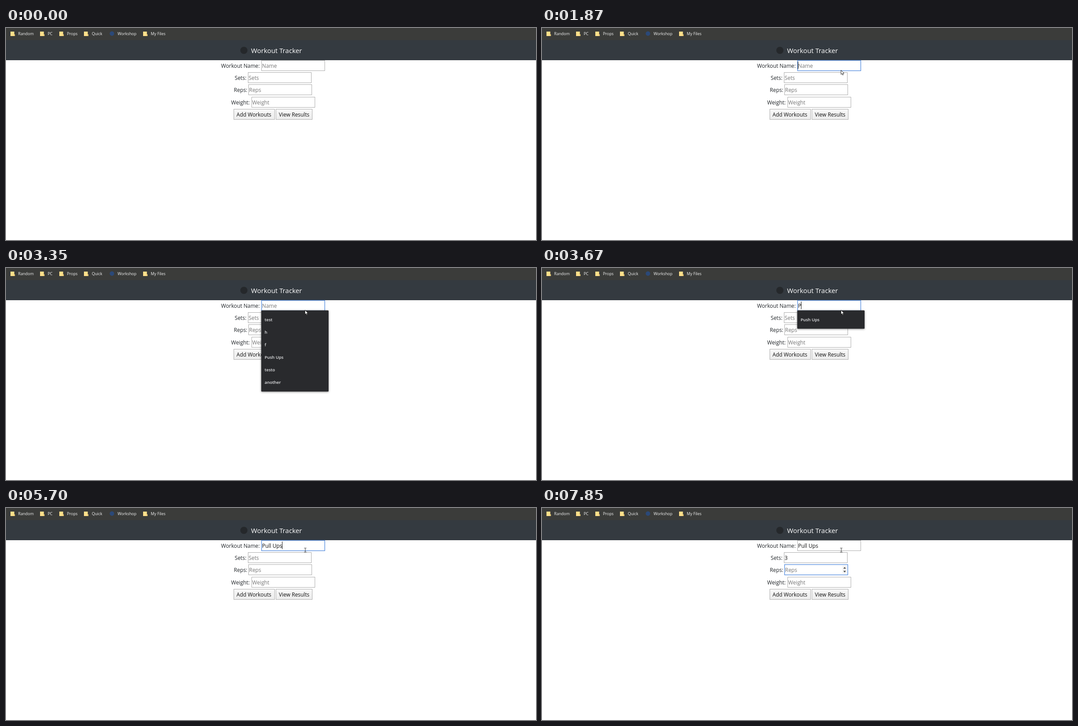
Recreate the animation shown at these times as an HTML page with a canvas. Size 1183x474 px, loop 8000 ms.

```html
<!DOCTYPE html>
<html lang="en">
<head>
<meta charset="utf-8">
<title>Workout form</title>
<style>
  html, body { margin: 0; width: 100%; height: 100%; overflow: hidden; background: #fff; }
  canvas { display: block; }
</style>
</head>
<body>
<canvas id="stage" width="1183" height="474"></canvas>
<script>
const ctx = document.getElementById('stage').getContext('2d');
const LOOP = 8000;
const FONT = '"Open Sans", "Noto Sans", sans-serif';
const INK = '#212529';
const HINT = '#757575';

const bookmarks = [
  [10, 27, 'Random'], [76, 93, 'PC'], [119, 136, 'Props'],
  [174, 191.5, 'Quick'], [231, 249, 'Workshop'], [306, 323, 'My Files']
];

// label x, box x, box top, text baseline
const fields = [
  { label: 'Workout Name:', hint: 'Name', lx: 480, x: 570, y: 72, base: 89 },
  { label: 'Sets:', hint: 'Sets', lx: 510.5, x: 540, y: 99, base: 116 },
  { label: 'Reps:', hint: 'Reps', lx: 508.5, x: 541, y: 126, base: 143 },
  { label: 'Weight:', hint: 'Weight', lx: 502.5, x: 548, y: 154, base: 171 }
];

const suggestions = ['test', 'h', 'f', 'Push Ups', 'testo', 'another'];
const typing = [3670, 3910, 4270, 4470, 4830, 5240, 5520, 5700];
const phrase = 'Pull Ups';

// pointer keys: time, x, y
const entry = [[260, 1095, 464], [310, 1020, 390], [360, 930, 312], [400, 868, 268], [450, 842, 255]];
const approach = [[730, 790, 190], [780, 718, 114], [830, 689.5, 93], [990, 677, 91], [1350, 668, 94]];

const within = (t, a, b) => t >= a && t < b;

function text(str, x, y, size, color, weight = 400) {
  ctx.font = `${weight} ${size}px ${FONT}`;
  ctx.fillStyle = color;
  ctx.fillText(str, x, y);
}

function rect(x, y, w, h, color) {
  ctx.fillStyle = color;
  ctx.fillRect(x, y, w, h);
}

function shape(points, fill, stroke) {
  ctx.beginPath();
  points.forEach(([x, y]) => ctx.lineTo(x, y));
  ctx.closePath();
  ctx.fillStyle = fill;
  ctx.fill();
  if (stroke) {
    ctx.strokeStyle = stroke;
    ctx.lineWidth = 0.9;
    ctx.stroke();
  }
}

function circle(x, y, r, color) {
  ctx.beginPath();
  ctx.arc(x, y, r, 0, Math.PI * 2);
  ctx.fillStyle = color;
  ctx.fill();
}

function folder(x) {
  rect(x, 8, 8.5, 10, '#ffe08a');
  rect(x + 8.5, 14, 1.5, 4, '#f7d375');
}

function header() {
  rect(0, 0, 1183, 27, '#3b3c3a');
  rect(0, 27, 1183, 45, '#343a40');
  bookmarks.forEach(([x, tx, name]) => {
    if (name === 'Workshop') circle(236.5, 12.5, 5, '#2b4978');
    else folder(x);
    text(name, tx, 16, 8.9, '#f4f4f4');
  });
  circle(531, 50, 8, '#25282b');
  text('Workout Tracker', 547, 56, 14.85, '#fff');
}

function spinner(f) {
  const x = f.x + 134.5, y = f.y + 12;
  rect(x - 5, y - 9, 10, 18, '#f3f3f3');
  shape([[x - 3, y - 2.5], [x, y - 6], [x + 3, y - 2.5]], '#444');
  shape([[x - 3, y + 2.5], [x, y + 6], [x + 3, y + 2.5]], '#444');
}

function field(f, value, focused, caret) {
  text(f.label, f.lx, f.base, 11.8, INK);
  ctx.strokeStyle = focused ? '#5a90de' : '#ababab';
  ctx.lineWidth = focused ? 1.4 : 1;
  ctx.strokeRect(f.x + 0.5, f.y + 0.5, 141, 23);
  text(value || f.hint, f.x + 1.6, f.base, 11.8, value ? '#111' : HINT);
  if (focused && f !== fields[0]) spinner(f);
  if (caret) {
    const w = value ? ctx.measureText(value).width - 0.5 : 0;
    rect(Math.round(f.x + 1.4 + w), f.y + 3, 1, 17, '#111');
  }
}

function button(x, w, label, tx) {
  const g = ctx.createLinearGradient(0, 181, 0, 205);
  g.addColorStop(0, '#f9f9f9');
  g.addColorStop(1, '#ececec');
  rect(x, 181, w, 24, g);
  ctx.strokeStyle = '#adadad';
  ctx.lineWidth = 1;
  ctx.strokeRect(x + 0.5, 181.5, w - 1, 23);
  text(label, tx, 198, 11.8, '#111');
}

function dropdown(items) {
  const h = 13 + items.length * 28.1;
  ctx.save();
  ctx.shadowColor = 'rgba(0,0,0,.45)';
  ctx.shadowBlur = 4;
  ctx.shadowOffsetY = 1;
  ctx.fillStyle = '#292a2d';
  ctx.beginPath();
  ctx.roundRect(569.7, 94.7, 150.3, h, 1.5);
  ctx.fill();
  ctx.restore();
  items.forEach((s, i) => text(s, 577.3, Math.round(118.5 + i * 28.1), 9.4, '#e4e5e7', 600));
}

function arrow(x, y) {
  const outline = [[0, 0], [0, 9.6], [2.2, 7.6], [3.7, 11], [5.2, 10.3], [3.8, 7.1], [6.8, 7]];
  shape(outline.map(([dx, dy]) => [x + dx + 0.4, y + dy + 0.2]), '#fff', '#1c1c1c');
}

function beam(x, y) {
  rect(x - 0.5, y - 4.5, 1, 9, '#333');
  for (const top of [y - 5, y + 4]) {
    rect(x - 2.5, top, 2.2, 1, '#444');
    rect(x + 0.3, top, 2.2, 1, '#444');
  }
}

// position along timed keys, held between captures
function along(keys, t) {
  const start = keys[0][0], end = keys[keys.length - 1][0];
  const held = t >= end ? end : start + Math.floor((t - start) / 50 + 0.01) * 50;
  let i = 0;
  while (i < keys.length - 2 && held >= keys[i + 1][0]) i++;
  const [t0, x0, y0] = keys[i], [t1, x1, y1] = keys[i + 1];
  const k = Math.min(1, (held - t0) / (t1 - t0));
  return [x0 + (x1 - x0) * k, y0 + (y1 - y0) * k];
}

function pointer(t) {
  if (t < 260) return;
  if (t < 730) return arrow(...along(entry, t));
  if (t < 830) return arrow(...along(approach, t));
  if (within(t, 1870, 4270)) return arrow(667, 94);
  if (within(t, 1710, 1870)) circle(666.5, 93.5, 9, 'rgba(255,255,0,.47)');
  beam(...along(approach, t));
}

function draw(t) {
  rect(0, 0, 1183, 474, '#fff');
  header();

  const typed = phrase.slice(0, typing.filter(k => t >= k).length);
  const values = [typed, t >= 6880 ? '3' : '', '', ''];
  const focus = t < 1870 ? -1 : t < 6220 ? 0 : t < 7290 ? 1 : 2;
  const blinkedOff = within(t, 2270, 2780) || within(t, 3350, 3670) ||
    within(t, 6780, 6880) || t >= 7850;
  fields.forEach((f, i) => field(f, values[i], i === focus, i === focus && !blinkedOff));

  button(508, 92, 'Add Workouts', 514.5);
  button(602, 82, 'View Results', 609);

  if (within(t, 1910, 3670)) dropdown(suggestions);
  else if (within(t, 3670, 4270)) dropdown(['Push Ups']);
  pointer(t);
}

const begin = performance.now();
function tick() {
  draw((performance.now() - begin) % LOOP);
  requestAnimationFrame(tick);
}
tick();
</script>
</body>
</html>
```
